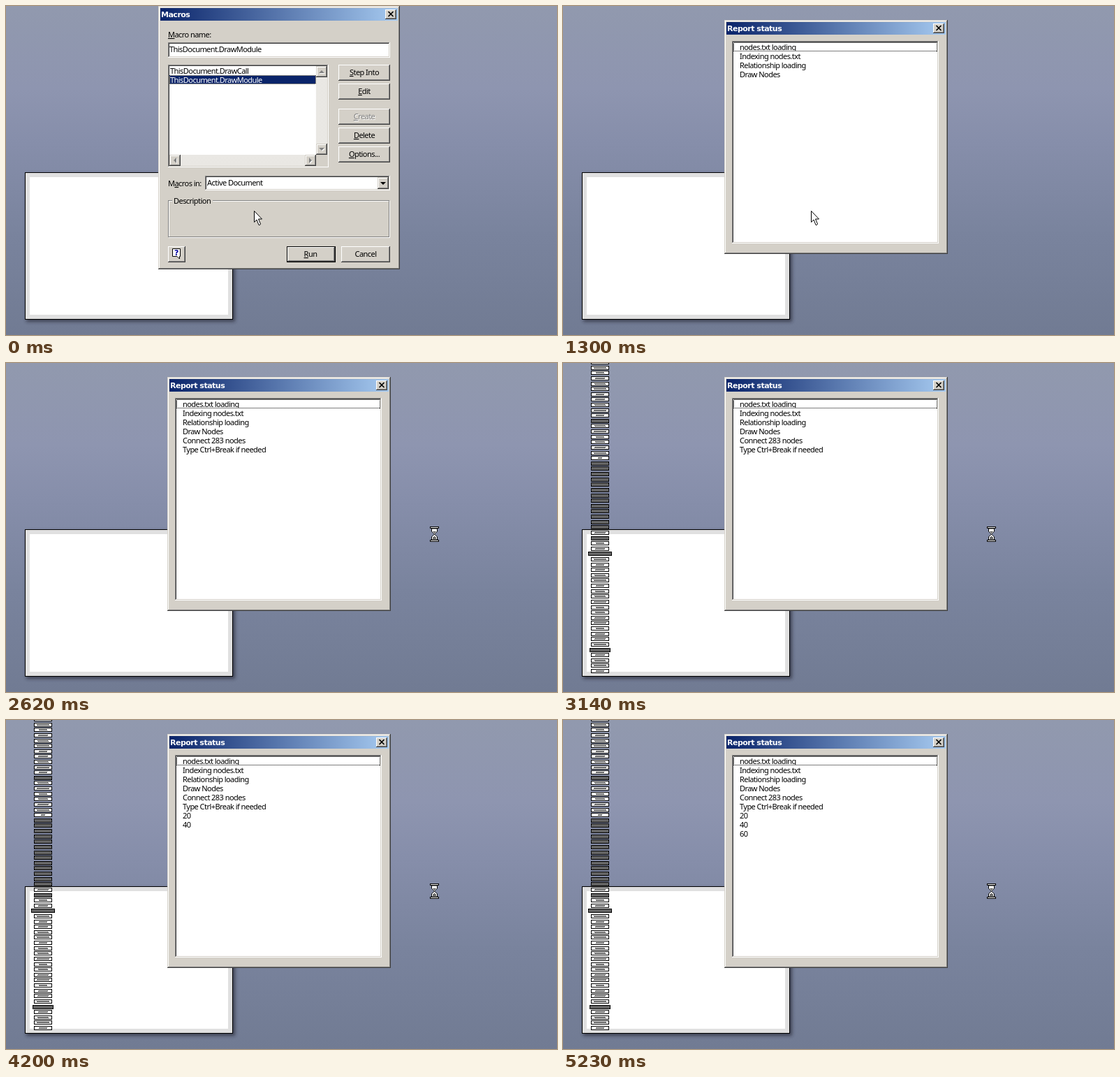
An HTML page for the animation above (8000 ms loop, 789 px wide and 471 px high).

```html
<!DOCTYPE html>
<html lang="en">
<head>
<meta charset="utf-8">
<title>Macro run</title>
<style>
html, body { margin: 0; width: 100%; height: 100%; overflow: hidden; background: #7f88a3; }
svg { display: block; width: 789px; height: 471px; }
rect, .crisp { shape-rendering: crispEdges; }
text { font: 11px "Noto Sans", "Open Sans", sans-serif; letter-spacing: -.55px; white-space: pre; }
.title { font: bold 11px "DejaVu Sans", sans-serif; letter-spacing: -.5px; fill: #fff; }
.mid { text-anchor: middle; }
u, .key { text-decoration: underline; }

.macros, .report, .arrow, .busy, .nodes, .n20, .n40, .n60 { animation: 8s step-end infinite; }
.macros { animation-name: macros; }
.report { animation-name: report; }
.arrow { animation-name: arrow; }
.busy { animation-name: busy; }
.nodes { animation-name: nodes; }
.n20 { animation-name: n20; }
.n40 { animation-name: n40; }
.n60 { animation-name: n60; }
@keyframes macros { 0% { visibility: visible } 16.25%, to { visibility: hidden } }
@keyframes report { 0% { visibility: hidden } 16.25%, to { visibility: visible } }
@keyframes busy { 0% { visibility: hidden } 32.75%, to { visibility: visible } }
@keyframes nodes { 0% { visibility: hidden } 39.25%, to { visibility: visible } }
@keyframes n20 { 0% { visibility: hidden } 45.875%, to { visibility: visible } }
@keyframes n40 { 0% { visibility: hidden } 52.5%, to { visibility: visible } }
@keyframes n60 { 0% { visibility: hidden } 65.375%, to { visibility: visible } }
@keyframes arrow {
  0% { transform: translate(355px, 293px); visibility: visible }
  26% { transform: translate(366px, 292px); visibility: visible }
  29.125% { transform: translate(548px, 281px); visibility: visible }
  32.75%, to { transform: translate(548px, 281px); visibility: hidden }
}
</style>
</head>
<body>
<svg id="stage" viewBox="0 0 789 471"></svg>
<script>
const FACE = '#d4d0c8', WHITE = '#fff', GREY = '#808080', DARK = '#404040', NAVY = '#0a246a';
const RAISED = [WHITE, FACE, GREY, DARK];
const FRAME = [FACE, WHITE, GREY, DARK];
const SUNKEN = [GREY, DARK, FACE, WHITE];

const rect = (x, y, w, h, fill) =>
  `<rect x="${x}" y="${y}" width="${w}" height="${h}" fill="${fill}"/>`;

const group = (cls, ...parts) => `<g class="${cls}">${parts.join('')}</g>`;

// "&" marks the underlined access key
const text = (x, y, str, cls = '', fill = '') =>
  `<text x="${x}" y="${y}" class="${cls}"${fill && ` fill="${fill}"`}>` +
  str.replace(/&(.)/, '<tspan class="key">$1</tspan>') + '</text>';

const bevel = (x, y, w, h, [tl, tl2, br2, br], fill = FACE) =>
  rect(x, y, w, h, br) + rect(x, y, w - 1, h - 1, tl) +
  rect(x + 1, y + 1, w - 2, h - 2, br2) + rect(x + 1, y + 1, w - 3, h - 3, tl2) +
  rect(x + 2, y + 2, w - 4, h - 4, fill);

const field = (x, y, w, h) => bevel(x, y, w, h, SUNKEN, WHITE);

const dotted = (x, y, w, h, color) =>
  `<rect x="${x + .5}" y="${y + .5}" width="${w - 1}" height="${h - 1}" fill="none" stroke="${color}" stroke-dasharray="1 1"/>`;

const button = (x, y, w, label, off) =>
  bevel(x, y, w, 23, RAISED) +
  (off ? text(x + w / 2 + 1, y + 16, label, 'mid', WHITE) : '') +
  text(x + w / 2, y + 15, label, 'mid', off ? GREY : '#000');

function frame(x, y, w, h, title) {
  const r = x + w;
  return bevel(x, y, w, h, FRAME) + rect(x + 3, y + 3, w - 6, 18, 'url(#bar)') +
    text(x + 4, y + 16, title, 'title') +
    bevel(r - 21, y + 5, 16, 14, RAISED) +
    `<path d="M${r - 16.5} ${y + 8}l7 7m0-7l-7 7" stroke="#000" stroke-width="1.7"/>`;
}

const triangle = (x, y, turn, fill) =>
  `<path d="M-4-2h8l-4 4z" fill="${fill}" transform="translate(${x} ${y}) rotate(${turn})"/>`;

const scrollButton = (x, y, turn) =>
  bevel(x, y, 16, 16, FRAME) + triangle(x + 9, y + 9, turn, WHITE) + triangle(x + 8, y + 8, turn, GREY);

const defs = `<defs>
  <linearGradient id="sky" x2="0" y2="1">
    <stop stop-color="#9199ae"/><stop offset=".25" stop-color="#8e95b0"/>
    <stop offset=".42" stop-color="#868eaa"/><stop offset=".7" stop-color="#79839d"/>
    <stop offset="1" stop-color="#717b93"/>
  </linearGradient>
  <linearGradient id="bar"><stop stop-color="${NAVY}"/><stop offset="1" stop-color="#a6caf0"/></linearGradient>
  <pattern id="track" width="2" height="2" patternUnits="userSpaceOnUse">
    ${rect(0, 0, 2, 2, FACE)}${rect(0, 0, 1, 1, WHITE)}${rect(1, 1, 1, 1, WHITE)}
  </pattern>
  <pattern id="ink" width="2" height="2" patternUnits="userSpaceOnUse">
    ${rect(0, 0, 2, 2, '#c8c8c8')}${rect(0, 0, 1, 1, '#000')}${rect(1, 1, 1, 1, '#000')}
  </pattern>
  <filter id="blur"><feGaussianBlur stdDeviation="2.5"/></filter>
</defs>`;

const page =
  `<rect x="29" y="241" width="299" height="211" fill="#20242e" opacity=".65" filter="url(#blur)"/>` +
  rect(27, 238, 298, 211, '#000') + rect(28, 239, 296, 209, '#e0e0e0') + rect(34, 245, 284, 197, WHITE);

function node(i) {
  const w = i === 22 ? 34 : i === 4 ? 30 : 26;
  const x = 53 - w / 2, y = Math.round(438 - 7.62 * i);
  const dense = w > 26 || i === 25 || i === 47 || (i > 26 && i < 40);
  const inner = dense ? w - 2 : i === 40 ? 6 : 12 + i * 7 % 4 * 2;
  return rect(x, y, w, 6, '#000') + rect(x + 1, y + 1, w - 2, 4, WHITE) +
    rect(53 - inner / 2, y + (dense ? 1 : 2), inner, dense ? 4 : 2, 'url(#ink)');
}
const nodes = Array.from({ length: 59 }, (_, i) => node(i));

const list = [
  field(232, 84, 230, 147),
  text(235, 97, 'ThisDocument.DrawCall'),
  rect(234, 99, 210, 13, NAVY), dotted(234, 99, 210, 13, '#f5db95'),
  text(235, 110, 'ThisDocument.DrawModule', '', WHITE),
  rect(444, 86, 16, 127, 'url(#track)'), rect(234, 213, 210, 16, 'url(#track)'),
  rect(444, 213, 16, 16, FACE),
  scrollButton(444, 86, 180), scrollButton(444, 197, 0),
  scrollButton(234, 213, 90), scrollButton(428, 213, -90)
];

const etched = (x, y, w, h, color) =>
  `<rect x="${x + .5}" y="${y + .5}" width="${w}" height="${h}" fill="none" stroke="${color}"/>`;

const help = bevel(232, 344, 25, 23, RAISED) +
  `<path d="M238.5 347.5h11v11h-1v3.5l-3.5-3.5h-6.500z" fill="#fff" stroke="#000"/>` +
  `<text x="244" y="357" class="title mid" style="fill:#0000a0">?</text>`;

const macros = group('macros',
  frame(218, 0, 346, 377, 'Macros'),
  text(232, 45, '&Macro name:'),
  field(232, 52, 318, 22), text(234, 66, 'ThisDocument.DrawModule'),
  ...list,
  button(476, 84, 74, '&Step Into'), button(476, 111, 74, '&Edit'),
  button(476, 147, 74, '&Create', true), button(476, 174, 74, '&Delete'),
  button(476, 201, 74, '&Options...'),
  text(232, 258, 'M&acros in:'),
  field(285, 243, 265, 21), text(288, 257, 'Active Document'),
  bevel(532, 245, 16, 17, FRAME), triangle(540, 254, 0, '#000'),
  etched(233, 279, 316, 52, WHITE), etched(232, 278, 316, 52, GREY),
  rect(238, 276, 58, 6, FACE), text(240, 283, 'Description'),
  help,
  rect(402, 344, 70, 23, '#000'), bevel(403, 345, 68, 21, RAISED),
  text(436, 359, '&Run', 'mid'),
  button(480, 344, 70, 'Cancel'));

const row = (i, str, cls) => text(253, 63 + 13 * i, str, cls);

const report = group('report',
  frame(231, 20, 320, 335, 'Report status'),
  field(242, 50, 296, 290),
  row(0, 'nodes.txt loading'),
  rect(244, 64, 292, 3, WHITE), dotted(244, 52, 292, 13, '#000'),
  row(1, 'Indexing nodes.txt'), row(2, 'Relationship loading'), row(3, 'Draw Nodes')) +
  row(4, 'Connect 283 nodes', 'busy') + row(5, 'Type Ctrl+Break if needed', 'busy') +
  row(6, '20', 'n20') + row(7, '40', 'n40') + row(8, '60', 'n60');

const arrow = group('arrow',
  `<path d="M.5 .5V16.500L4 13L7 20.500H8.500L9.500 19L6.500 12H11.500Z" fill="#fff" stroke="#000"/>`);

const hourglass = group('busy',
  `<g transform="translate(607 234)">
    <path d="M2.500 3v4l3.500 3.500v1L2.500 15v4h8v-4L7 11.500v-1L10.500 7V3z" fill="#fff" stroke="#000"/>
    <path d="M4 7h5L6.500 9.500zM4 18v-2l2.500-2 2.500 2v2z" fill="url(#ink)"/>
    ${rect(0, 0, 13, 3, '#000')}${rect(1, 1, 11, 1, WHITE)}
    ${rect(0, 19, 13, 3, '#000')}${rect(1, 20, 11, 1, WHITE)}
  </g>`);

document.getElementById('stage').innerHTML =
  defs + rect(0, 0, 789, 471, 'url(#sky)') + page + group('nodes', ...nodes) +
  macros + report + hourglass + arrow;
</script>
</body>
</html>
```
